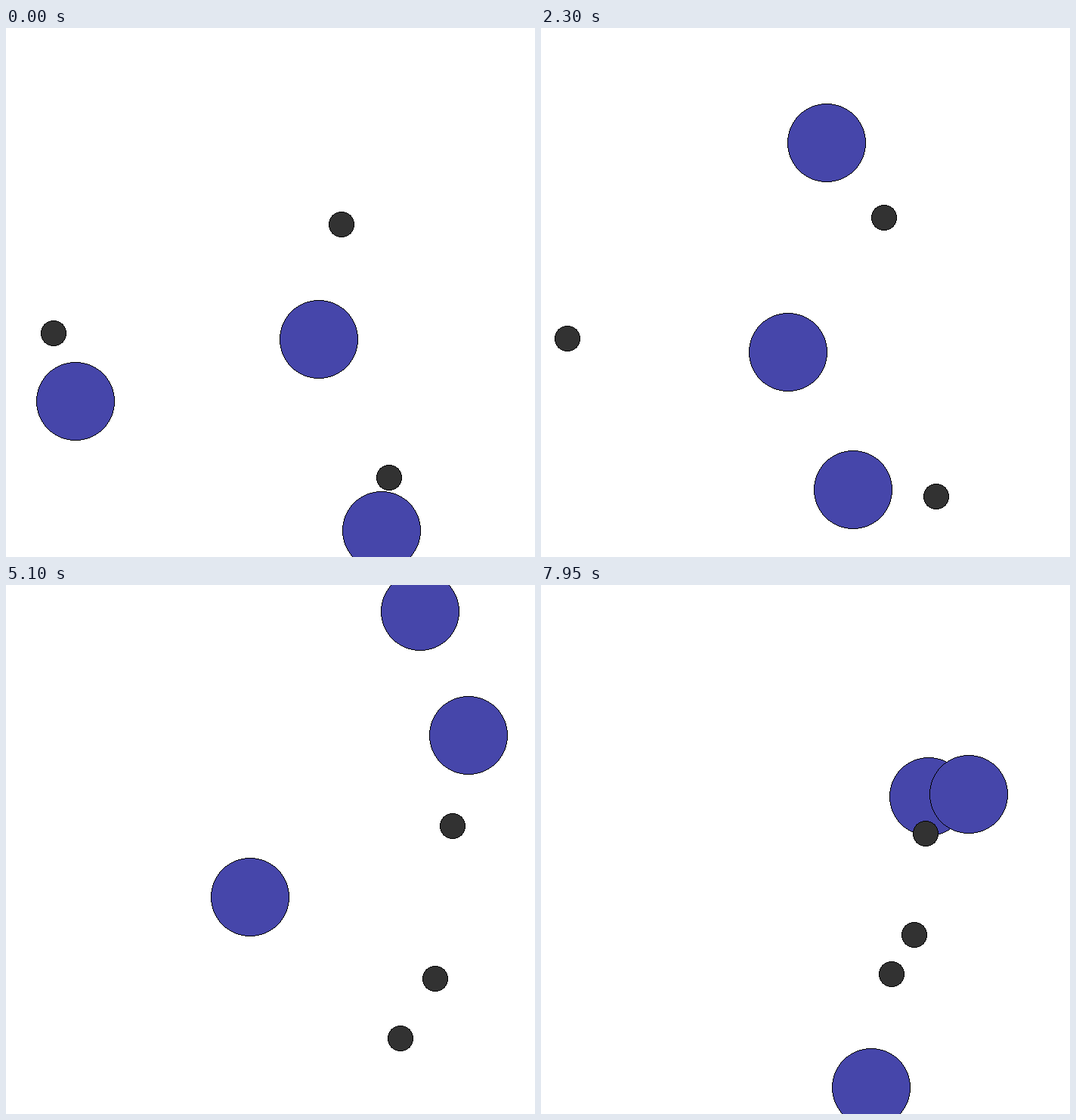
An HTML page with a canvas that plays this animation: 700x700 px, repeating every 8000 ms.

```html
<!DOCTYPE html>
<html lang="en">
<head>
<meta charset="utf-8">
<title>Agents and landmarks</title>
<style>
html, body { margin: 0; width: 100%; height: 100%; overflow: hidden; background: #fff; }
canvas { display: block; }
</style>
</head>
<body>
<canvas id="stage" width="700" height="700"></canvas>
<script>
const STEP = 50, STEPS = 160, EPISODE = 100, HALF = 350, MARGIN = 0.9;
const ctx = document.getElementById('stage').getContext('2d');

// Agents pass through one point per key step, in world units.
const episodes = [
  {
    keys: [0, 19, 38, 46, 67, 84],
    landmarks: [[116.4, -109.05], [-350, 68.2], [193.7, 300.6]],
    agents: [
      [[80, 76.5], [250, -93], [48, -338], [32.5, -219.5], [-9.5, -122.5], [15, -80]],
      [[-314.3, 176.7], [-389.5, 94], [-78, 86], [-24.5, 88.5], [163.5, 0.5], [222, -30]],
      [[181, 385.25], [108.5, 310], [70.5, 294], [70.5, 290.5], [70.5, 272.5], [70.5, 272]]
    ]
  },
  {
    keys: [102, 122, 135, 159],
    landmarks: [[268.5, -33.5], [243.1, 190.995], [192.02, 278.4]],
    agents: [
      [[220.5, -350], [216, -110], [212.3, -41], [275.9, -115.6]],
      [[292.5, -166.5], [278, 0], [363.3, 170.7], [363.6, -121.7]],
      [[-29.5, 70.5], [91, 130], [93.9, 158.3], [147.4, 529.1]]
    ]
  }
];

function slope(keys, values, i) {
  const rate = j => (values[j + 1] - values[j]) / (keys[j + 1] - keys[j]);
  if (i === 0) return rate(0);
  if (i === keys.length - 1) return rate(i - 1);
  const a = rate(i - 1), b = rate(i);
  return a * b > 0 ? 2 * a * b / (a + b) : 0;
}

// Monotone cubic interpolation, so turning points stay at the keys.
function interpolate(keys, values, step) {
  const last = keys.length - 1;
  const t = Math.min(Math.max(step, keys[0]), keys[last]);
  let i = 0;
  while (i < last - 1 && keys[i + 1] <= t) i++;
  const span = keys[i + 1] - keys[i], u = (t - keys[i]) / span, v = 1 - u;
  return values[i] * (1 + 2 * u) * v * v + values[i + 1] * u * u * (3 - 2 * u) +
    span * u * v * (slope(keys, values, i) * v - slope(keys, values, i + 1) * u);
}

// Hard-edged disc with a one-pixel black outline, row by row.
function disc([x, y], radius, color) {
  const halfWidth = row =>
    row < radius ? Math.round(Math.sqrt(radius * radius - (row + 0.5) ** 2)) : 0;
  for (let row = 0; row < radius; row++) {
    const outer = halfWidth(row), inner = Math.min(outer - 1, halfWidth(row + 1));
    for (const top of [y + row, y - row - 1]) {
      ctx.fillStyle = '#000';
      ctx.fillRect(x - outer, top, 2 * outer, 1);
      ctx.fillStyle = color;
      ctx.fillRect(x - inner, top, 2 * inner, 1);
    }
  }
}

function draw(step) {
  const { keys, landmarks, agents } = episodes[Math.floor(step / EPISODE)];
  const places = agents.map(path =>
    [0, 1].map(axis => interpolate(keys, path.map(p => p[axis]), step)));
  // The camera zooms to keep the farthest coordinate on the margin.
  const range = Math.max(...[...places, ...landmarks].flat().map(Math.abs));
  const toScreen = point => point.map(c =>
    Math.floor(HALF + MARGIN * Math.floor(c * HALF / range + 1e-9) + 1e-9));

  ctx.fillStyle = '#fff';
  ctx.fillRect(0, 0, 700, 700);
  places.forEach(p => disc(toScreen(p), 52, '#4646aa'));
  landmarks.forEach(p => disc(toScreen(p), 17, '#323232'));
}

const origin = performance.now();
function tick() {
  const elapsed = performance.now() - origin;
  draw(Math.floor(elapsed / STEP + 1e-6) % STEPS);
  requestAnimationFrame(tick);
}
tick();
</script>
</body>
</html>
```
